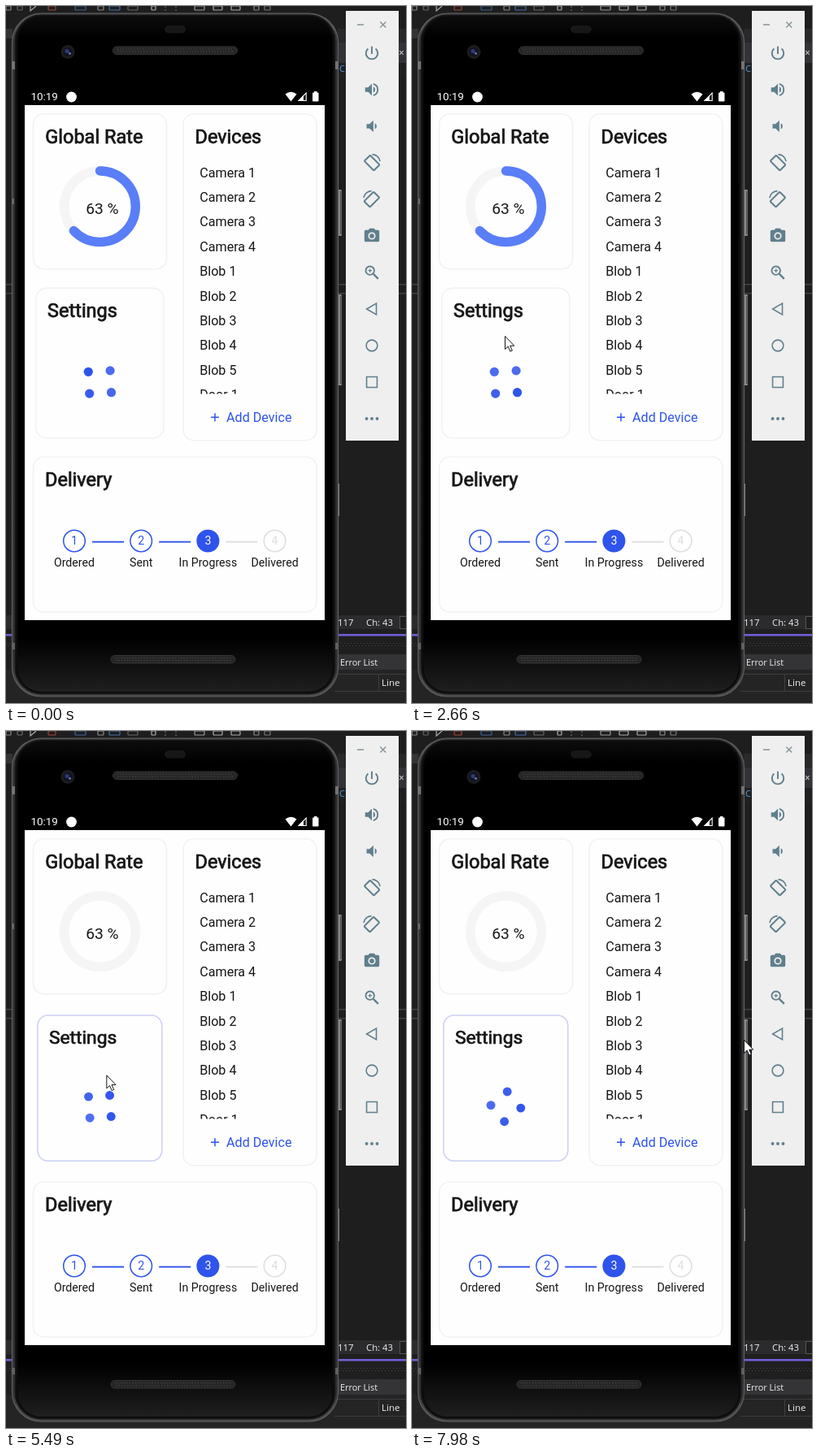
An HTML page for the animation above (8000 ms loop, 492x858 px).

```html
<!DOCTYPE html>
<html lang="en">
<head>
<meta charset="utf-8">
<title>Phone dashboard</title>
<style>
html, body { margin: 0; width: 100%; height: 100%; overflow: hidden; background: #1e1e1e; }
svg { display: block; width: 492px; height: 858px; }
text { font-family: Roboto, sans-serif; white-space: pre; }
.ide text { font-family: "Open Sans", sans-serif; }
.knob { filter: drop-shadow(0 1px 1.8px rgba(0, 35, 11, .22)); }
</style>
</head>
<body>
<svg id="stage" viewBox="0 0 492 858" xmlns="http://www.w3.org/2000/svg"></svg>
<script>
const BLUE = '#2f54eb', LIGHT = '#597ef7', INK = '#161616', STEEL = '#5f7f8d';

const text = (x, y, size, str, fill = INK, more = '') =>
  `<text x="${x}" y="${y}" font-size="${size}" fill="${fill}" ${more}>${str}</text>`;
const mid = 'text-anchor="middle"';
const bold = w => `stroke="${INK}" stroke-width="${w}"`;
const rect = (x, y, w, h, fill, r = 0, more = '') =>
  `<rect x="${x}" y="${y}" width="${w}" height="${h}" rx="${r}" fill="${fill}" ${more}/>`;
const circle = (x, y, r, fill, more = '') => `<circle cx="${x}" cy="${y}" r="${r}" fill="${fill}" ${more}/>`;
const path = (d, fill, more = '') => `<path d="${d}" fill="${fill}" ${more}/>`;
const line = (d, color, w, more = '') => path(d, 'none', `stroke="${color}" stroke-width="${w}" ${more}`);
// 24-unit icon centred on x, y
const icon = (x, y, s, body) => `<g transform="translate(${x} ${y}) scale(${s}) translate(-12 -12)">${body}</g>`;
const card = (x, y, w, h) => rect(x, y, w, h, '#fefefe', 13, 'stroke="#f2f2f2" stroke-width="1.6"');
const title = (x, y, str) => text(x, y, 23.5, str, INK, bold(.75));

function ide() {
  const marks = [[0, 6, '#888'], [14, 6, '#666'], [52, 9, '#a04338'], [85, 13, '#3a649a'], [113, 7, '#888'],
    [127, 13, '#4270ac'], [150, 12, '#666'], [179, 5, '#aaa'], [232, 12, '#999'], [255, 11, '#aaa'],
    [277, 11, '#aaa'], [305, 6, '#888'], [318, 7, '#777']];
  return `<g class="ide">` + rect(0, 0, 492, 858, '#1e1e1e') +
    marks.map(([x, w, c]) => rect(x, 0, w, 5, 'none', 1, `stroke="${c}" stroke-width="1.2"`)).join('') +
    line('M30 0V6L37 0', '#aaa', 1.2) + line('M196 0V6M209 0V6', '#777', 1, 'stroke-dasharray="2 2"') +
    rect(408, 28, 84, 17, '#29292b') + rect(408, 45, 84, 25, '#333337') + rect(408, 70, 84, 19, '#202022') +
    text(410, 81, 11, 'C', '#4f9bd8') + text(483, 62, 12, '×', '#ddd') +
    rect(0, 342, 492, 1.5, '#434346') + rect(0, 353, 492, 1.5, '#434346') +
    rect(0, 28, 8, 12, '#333') + rect(408, 588, 2, 40, '#888') +
    rect(0, 750, 492, 17, '#2b2b2d') + rect(484.5, 751.5, 8, 15, '#1e1e1e', 0, 'stroke="#555"') +
    text(408, 763, 11.4, '117', '#eee') + text(443, 763, 11.3, 'Ch: 43', '#eee') +
    rect(0, 767, 492, 31, '#1f1f20') + rect(0, 773, 492, 2.6, '#6f5ed3') +
    line('M0 784.5H492M2 787.5H492', '#47474a', 1, 'stroke-dasharray="1 3"') +
    rect(404, 798, 88, 19, '#343437') + text(411, 812, 10.9, 'Error List', '#f1f1f1') +
    rect(0, 817, 492, 41, '#242425') + line('M404 822.5H492M404 843.5H492M458.5 823V843', '#3e3e41', 1) +
    text(462, 837, 11.5, 'Line', '#f1f1f1') + '</g>';
}

function phone() {
  const grill = (x, y) => rect(x, y, 153, 9.5, '#252525', 4.7, 'stroke="#363636"') +
    line(`M${x + 5} ${y + 3.2}h144M${x + 6} ${y + 6.2}h142`, '#444', 1.2, 'stroke-dasharray="1.5 2"');
  return rect(407, 226, 6, 57, '#8b8b8b', 1.5) + rect(407, 355, 6, 112, '#8b8b8b', 1.5) +
    rect(411, 228, 1.5, 53, '#4b4b4b') + rect(411, 357, 1.5, 108, '#4b4b4b') +
    rect(7.5, 9, 401, 841, 'url(#edge)', 36, 'stroke="#606062" stroke-width="1.2"') +
    rect(11.5, 11.5, 393, 835, '#0b0b0b', 32, 'stroke="#161616" stroke-width="2"') +
    rect(14.5, 14, 387, 830, 'url(#glass)', 29) +
    rect(7, 68, 4, 10, '#727272') + rect(405, 68, 4, 10, '#727272') +
    rect(7, 784, 4, 8, '#606060') + rect(405, 784, 4, 8, '#606060') + rect(7, 237, 3, 7, '#666') +
    rect(195, 24, 26, 9.5, '#171717', 4.7) + grill(131.5, 50) + grill(129, 799.5) +
    circle(76, 56.5, 8.5, '#1c1c20') + circle(76, 56.5, 5.5, '#11131f') +
    circle(75, 55.5, 2.6, '#2b3a78') + circle(78.5, 58.5, 1.4, '#6b78b4') +
    text(30.5, 116.3, 13.4, '10:19', '#fff') + circle(80.5, 112, 6.4, '#fff') +
    path('M343.5 108.5Q350.5 103 357.5 108.5L350.5 117.5Z', '#fff') +
    line('M369.2 107V116.5H360Z', '#fff', 1.1) + path('M366 110V117H359Z', '#fff') +
    rect(377, 106.5, 7.5, 11, '#fff', 1) + rect(379, 105, 3.5, 2, '#fff') +
    rect(23, 122, 369, 634, '#fefefe');
}

function home() {
  const items = ['Camera 1', 'Camera 2', 'Camera 3', 'Camera 4', 'Blob 1', 'Blob 2', 'Blob 3', 'Blob 4', 'Blob 5', 'Door 1'];
  const steps = ['Ordered', 'Sent', 'In Progress', 'Delivered'].map((label, i) => {
    const x = 84 + i * 82.2, c = i < 3 ? BLUE : '#dedede';
    return circle(x, 658.5, 13.3, i == 2 ? BLUE : '#fff', `stroke="${c}" stroke-width="1.5"`) +
      text(x, 663.4, 14.2, i + 1, i == 2 ? '#fff' : c, mid) + text(x, 690.4, 14.2, label, INK, mid) +
      (i < 3 ? rect(x + 22, 658.7, 39, 1.9, i < 2 ? BLUE : '#dedede') : '');
  });
  const arc = Math.PI * 2 * 43.8;
  return `<g id="home">` + card(33.5, 132.7, 164, 191) + title(48.3, 168.6, 'Global Rate') +
    circle(115.5, 246.8, 43.8, 'none', 'stroke="#f5f5f5" stroke-width="11.4"') +
    circle(115.5, 246.8, 43.8, 'none', `id="ring" stroke="${LIGHT}" stroke-width="11.4" stroke-linecap="round"
      stroke-dasharray="${arc * .63} ${arc}" transform="rotate(-90 115.5 246.8)"`) +
    text(118.5, 256, 19.2, '63 %', INK, mid) +
    card(218, 132.7, 164, 402) + title(232.5, 168.6, 'Devices') +
    '<g clip-path="url(#list)">' + items.map((s, i) => text(238.2, 210.6 + i * 30.4, 16.15, s)).join('') + '</g>' +
    line('M252 506.3H262M257 501.3V511.3', BLUE, 1.5) + text(271, 511.6, 16.15, 'Add Device', BLUE) +
    `<g id="tile">` + card(36.7, 347.4, 157.2, 184.4) +
    rect(36.7, 347.4, 157.2, 184.4, 'none', 13, 'id="glow" stroke="#cfd3f5" stroke-width="1.6"') +
    title(51.1, 383.2, 'Settings') + `<g id="dots">` + circle(0, 0, 5.6, BLUE).repeat(4) + '</g></g>' +
    card(33.5, 555, 348.5, 191) + title(48, 591, 'Delivery') + steps.join('') + '</g>';
}

function settings() {
  const row = (y, s) => text(92.7, y, 17.95, s);
  const ringed = x => circle(x, 717, 8.4, 'none', `stroke="${BLUE}" stroke-width="1.7"`) + line(`M${x - 4.5} 717h9`, BLUE, 1.7);
  const rays = [0, 1, 2, 3, 4].map(i => `<path d="M0 -7.5V-10" transform="rotate(${-90 + i * 45})"/>`).join('');
  const person = 'M12 2a10 10 0 1 0 0 20a10 10 0 1 0 0-20zM7.35 18.5C8.66 17.56 10.26 17 12 17s3.34.56 4.65 1.5' +
    'c-1.31.94-2.91 1.5-4.65 1.5s-3.34-.56-4.65-1.5zm10.79-1.38C16.45 15.8 14.32 15 12 15s-4.45.8-6.14 2.12' +
    'C4.7 15.73 4 13.95 4 12a8 8 0 1 1 16 0c0 1.95-.7 3.73-1.86 5.12z';
  const lang = 'M12.87 15.07l-2.54-2.51.03-.03c1.74-1.94 2.98-4.17 3.71-6.53H17V4h-7V2H8v2H1v1.99h11.17' +
    'C11.5 7.92 10.44 9.75 9 11.35 8.07 10.32 7.3 9.19 6.69 8h-2c.73 1.63 1.73 3.17 2.98 4.56l-5.09 5.02L4 19l5-5 ' +
    '3.11 3.11.76-2.04zM18.5 10h-2L12 22h2l1.12-3h4.75L21 22h2l-4.5-12zm-2.62 7l1.62-4.33L19.12 17h-3.24z';
  const back = 'M20 11H7.83l5.59-5.59L12 4l-8 8 8 8 1.41-1.41L7.83 13H20z';
  return `<g id="settings">` +
    icon(68, 164.6, 2.12, path(back, '#505050')) +
    text(45.6, 250.8, 42.4, 'Settings', INK, bold(1.3)) +
    icon(120, 334.2, 3.55, path(person, '#a8a8a8', 'fill-rule="evenodd"') +
      circle(12, 9.5, 2.5, 'none', 'stroke="#a8a8a8" stroke-width="2"')) +
    text(120, 403.7, 18.8, 'Luc Tavernel', INK, mid + bold(.6)) +
    text(120, 423, 13.35, 'LucTavernel@monbox.test', INK, mid) +
    rect(226.2, 320, 1.8, 88, '#dcdcdc') +
    text(309, 372.7, 38.3, '128', INK, mid + bold(1.2)) + text(309, 393.6, 13.4, 'Level', INK, mid) +
    row(503.5, 'Dark Theme') + row(563, 'Langage') + row(618.4, 'Brightness') + row(723.2, 'Devices') +
    line('M70 528.5H350M70 583.5H350M70 754.5H350', '#dedede', 1.2) +
    `<g transform="translate(54 496.5)" stroke="${INK}" stroke-width="1.8" fill="none">${rays}` +
    `<path d="M-2.5 6V4A5 5 0 1 1 2.5 4V6ZM-2.5 9.2H2.5"/></g>` +
    icon(54, 556.5, .96, path(lang, INK)) +
    path('M48 602A10 10 0 1 1 48 620.4A9.6 9.6 0 0 0 48 602Z', INK) +
    line('M62 709.8H46V721H50M53 714H57V721H53ZM59.5 713H62V721.2H59.5Z', INK, 1.4) +
    rect(319.3, 485, 52.5, 26, '#dcdcdc', 13) + circle(332.7, 498, 11.4, '#fff', 'class="knob"') +
    line('M358.5 550.5L364.5 556.5L358.5 562.5', '#9c9c9c', 1.7) +
    rect(94, 635.8, 272, 4, '#f3f3f3', 2) + rect(94, 635.8, 180, 4, 'url(#fill)', 2) +
    circle(273.5, 637.6, 9.4, '#fff', 'class="knob" stroke="#ddd" stroke-width=".8"') +
    ringed(268.5) + ringed(348) + line('M348 712.5v9', BLUE, 1.7) + text(309, 723.2, 17.95, '5', INK, mid) + '</g>';
}

function toolbar() {
  const stroke = (d, w = 2) => line(d, STEEL, w);
  const speaker = path('M3 9v6h4l5 5V4L7 9z', STEEL);
  const wave = path('M14 7.97v8.05a4.5 4.5 0 0 0 0-8.05z', STEEL);
  const turn = '<rect x="6.5" y="3.2" width="11" height="18" rx="1.2" transform="rotate(-45 12 12)" fill="none" ' +
    `stroke="${STEEL}" stroke-width="2.2"/>` + stroke('M12.5 .8A11 11 0 0 1 23 10', 1.8);
  const icons = [
    stroke('M12 3V13M7 6A7.9 7.9 0 1 0 17 6', 2.1),
    speaker + wave + stroke('M14 4.3A8 8 0 0 1 14 19.7'),
    `<g transform="translate(2 0)">${speaker + wave}</g>`,
    turn,
    `<g transform="translate(24 0) scale(-1 1)">${turn}</g>`,
    path('M9 2L7.2 4H4Q2 4 2 6V18Q2 20 4 20H20Q22 20 22 18V6Q22 4 20 4H16.8L15 2zM12 7a5 5 0 1 1 0 10a5 5 0 1 1 0-10z',
      STEEL, 'fill-rule="evenodd"') + circle(12, 12, 3.1, STEEL),
    circle(9.5, 9.5, 5.7, 'none', `stroke="${STEEL}" stroke-width="2"`) + stroke('M14 14L20.5 20.5', 2.5) + stroke('M7 9.5H12M9.5 7V12', 1.3),
    stroke('M18 4.5V19.5L5 12Z', 1.7),
    circle(12, 12, 7.5, 'none', `stroke="${STEEL}" stroke-width="1.7"`),
    stroke('M5 5H19V19H5Z', 1.7),
    [5, 12, 19].map(x => circle(x, 12, 2.1, STEEL)).join('')
  ];
  return rect(418, 6, 65, 529, '#efefef') +
    line('M432 23H440M460.3 19.5L467.3 26.5M467.3 19.5L460.3 26.5', '#84949b', 1.4) +
    rect(431, 356, 40, 35, '#cfd5d8', 2, 'id="press"') +
    icons.map((s, i) => icon(450, 58 + i * 45, .92, s)).join('');
}

const stage = document.getElementById('stage');
stage.innerHTML = `<defs>
  <linearGradient id="edge"><stop stop-color="#303032"/><stop offset=".015" stop-color="#474749"/>
  <stop offset=".985" stop-color="#474749"/><stop offset="1" stop-color="#29292b"/></linearGradient>
  <linearGradient id="glass" x2="0" y2="1"><stop stop-color="#0c0c0c"/><stop offset=".03"/>
  <stop offset=".92"/><stop offset="1" stop-color="#1f1f1f"/></linearGradient>
  <linearGradient id="fill"><stop stop-color="${BLUE}"/><stop offset="1" stop-color="${LIGHT}"/></linearGradient>
  <clipPath id="list"><rect x="219" y="180" width="160" height="297.5"/></clipPath></defs>` +
  ide() + phone() + home() + settings() + toolbar() +
  path('M.5 .5V16.6L4.2 13.1L6.8 19.2L9.3 18.1L6.7 12.2H11.7Z', '#fff', 'id="cursor" stroke="#14141c" stroke-width="1"');

const $ = id => document.getElementById(id);
const show = (el, on) => el.setAttribute('display', on ? 'inline' : 'none');
const parts = {};
['home', 'settings', 'ring', 'tile', 'glow', 'press', 'cursor'].forEach(id => parts[id] = $(id));
const dots = [...$('dots').children];

const STEP = 78.2, LOOP = 8000;
const TRACK = [[4, 401, 768], [11, 342, 662], [14, 164.5, 372.5], [17, 120, 92], [20, 80, 140], [22, 96, 187],
  [26, 62, 230], [30, 100, 330], [34, 114, 406], [38, 118, 421.5], [50, 118, 421.5], [55, 66, 158], [58, 68, 160],
  [61, 78, 196], [66, 120, 420], [72, 125, 425], [76, 391, 419], [80, 466, 369], [81, 466, 369], [82, 461, 361],
  [83, 456, 370], [90, 456, 370], [95, 425, 385], [101, 394, 387], [102, 408, 380]];
const PEAKS = [.6, .2, 0, .97];   // when each dot is darkest, s
const PULSE = 1.7;
const clamp = v => Math.max(0, Math.min(1, v));

function cursorAt(k) {
  const i = TRACK.findIndex(p => p[0] >= k);
  const b = TRACK[i < 0 ? TRACK.length - 1 : i], a = TRACK[Math.max(0, i - 1)];
  const u = b[0] > a[0] ? clamp((k - a[0]) / (b[0] - a[0])) : 1;
  return [a[1] + (b[1] - a[1]) * u, a[2] + (b[2] - a[2]) * u];
}

function draw(t) {
  const k = Math.floor(t / STEP + .3);
  const onSettings = (k >= 46 && k < 57) || (k >= 75 && k < 94);
  show(parts.settings, onSettings);
  show(parts.home, !onSettings);
  show(parts.ring, k < 46);

  const held = k < 57 ? clamp((k - 34) / 4) : clamp((k - 66) / 4);
  parts.tile.setAttribute('transform', `translate(115.3 439.6) scale(${1 - .028 * held}) translate(-115.3 -439.6)`);
  parts.glow.setAttribute('opacity', held);

  const spin = k < 57 ? Math.min(k, 39) : Math.min(k - 47, 25.2);
  const turn = spin < 14 ? 42 + spin * 318 / 14 : 360 + (spin - 14) * 24.6;
  dots.forEach((dot, i) => {
    const a = (turn + i * 90) * Math.PI / 180;
    const phase = (((spin * STEP / 1000 - PEAKS[i]) / PULSE) % 1 + 1) % 1;
    dot.setAttribute('cx', 115.4 + 19 * Math.cos(a));
    dot.setAttribute('cy', 463 + 19 * Math.sin(a));
    dot.setAttribute('opacity', .84 + .16 * Math.abs(1 - 2 * phase));
  });

  show(parts.press, k === 88);
  show(parts.cursor, k >= 4);
  const [x, y] = cursorAt(k);
  parts.cursor.setAttribute('transform', `translate(${x} ${y})`);
}

const start = performance.now();
function tick() {
  draw((performance.now() - start) % LOOP);
  requestAnimationFrame(tick);
}
tick();
</script>
</body>
</html>
```
